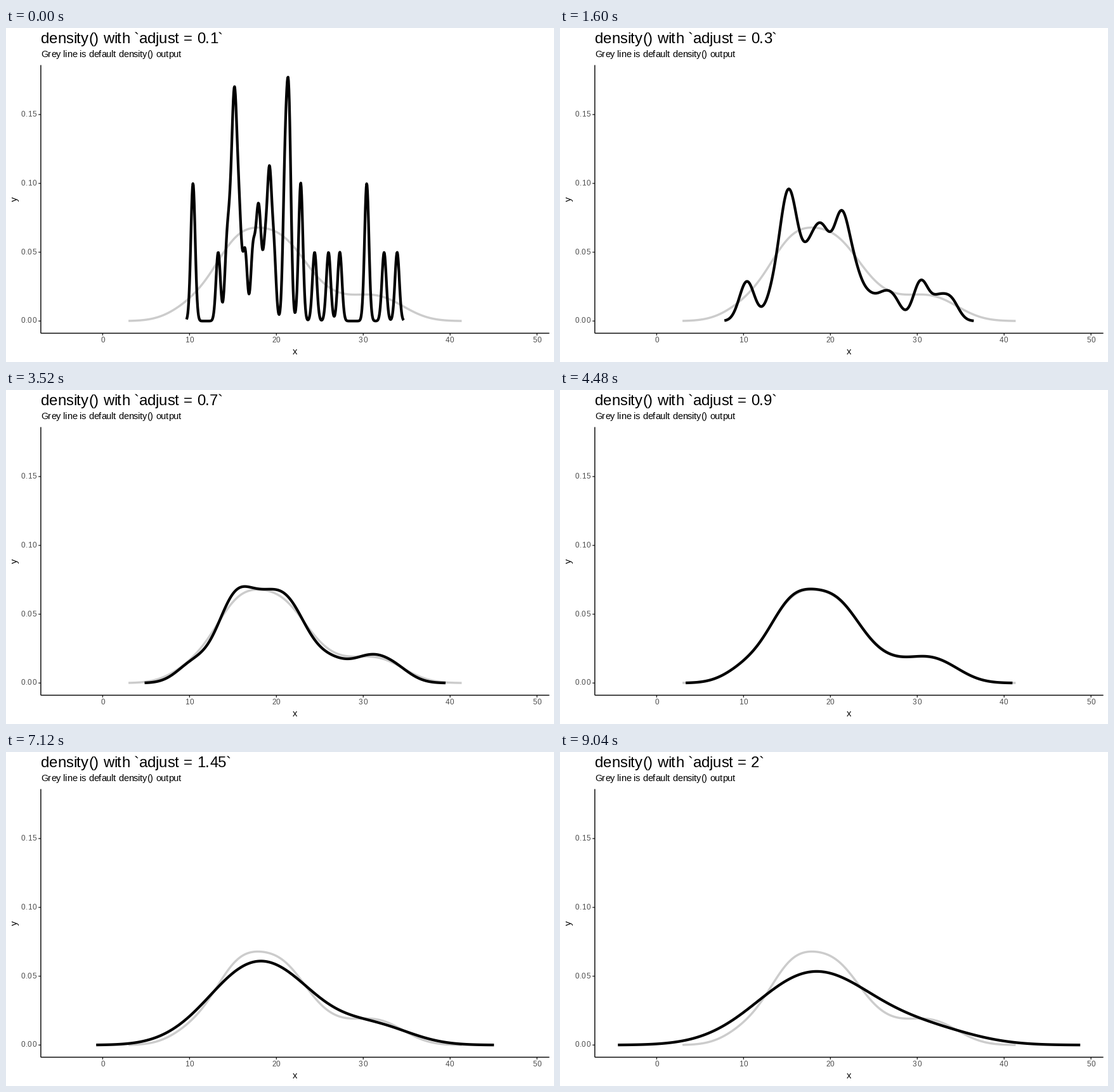
Recreate the animation shown at these times as a matplotlib script. Size 864 by 528 pixels, loop 9.6 s.

```python
import numpy as np
import matplotlib
import matplotlib.pyplot as plt
from matplotlib.animation import FuncAnimation
from matplotlib.textpath import TextPath

matplotlib.rcParams["font.family"] = "Liberation Sans"
matplotlib.rcParams["path.simplify"] = False

W, H, DPI = 864, 528, 96
FRAMES, INTERVAL = 120, 80
LEFT, RIGHT, TOP, BOTTOM = 54.9, 856.67, 58.6, 482.5
X0, X_SCALE = 152.4, 13.696
Y0, Y_SCALE = 463.25, 2176.4
TICK = 3.67
LAST_STATE = 38

DATA = np.array([
    21.0, 21.0, 22.8, 21.4, 18.7, 18.1, 14.3, 24.4, 22.8, 19.2, 17.8,
    16.4, 17.3, 15.2, 10.4, 10.4, 14.7, 32.4, 30.4, 33.9, 21.5, 15.5,
    15.2, 13.3, 19.2, 27.3, 26.0, 30.4, 15.8, 19.7, 15.0, 21.4])


def bandwidth(data):
    """Silverman's rule of thumb."""
    q1, q3 = np.percentile(data, [25, 75])
    spread = min(data.std(ddof=1), (q3 - q1) / 1.34)
    return 0.9 * spread * len(data) ** -0.2


def density(adjust, n=512):
    """Gaussian density of linearly binned data, cut three bandwidths out."""
    bw = adjust * bandwidth(DATA)
    lo, hi = DATA.min() - 3 * bw, DATA.max() + 3 * bw
    grid = np.linspace(lo - 4 * bw, hi + 4 * bw, n)
    pos = (DATA - grid[0]) / (grid[1] - grid[0])
    cell = pos.astype(int)
    part = pos - cell
    mass = (np.bincount(cell, 1 - part, minlength=n)
            + np.bincount(cell + 1, part, minlength=n))
    z = (grid[:, None] - grid) / bw
    dens = np.exp(-z * z / 2) @ mass / (len(DATA) * bw * np.sqrt(2 * np.pi))
    xs = np.linspace(lo, hi, n)
    return xs, np.interp(xs, grid, dens)


def to_px(xs, ys):
    return X0 + X_SCALE * np.asarray(xs), Y0 - Y_SCALE * np.asarray(ys)


def line_pt(size_mm):
    """Line size in mm to a line width in points."""
    return size_mm * 72.27 / 25.4 * 72 / 96


fig = plt.figure(figsize=(W / DPI, H / DPI), dpi=DPI, facecolor="white")
ax = fig.add_axes([0, 0, 1, 1])
ax.set_xlim(0, W)
ax.set_ylim(H, 0)
ax.axis("off")


def stroke(xs, ys, color, size_mm):
    line, = ax.plot(xs, ys, color=color, lw=line_pt(size_mm), snap=False,
                    solid_capstyle="butt", solid_joinstyle="round")
    return line


def ink_width(s):
    return TextPath((0, 0), s, size=100).get_extents().width / 100


em_widths = {}


def advance(ch, size):
    """Advance of a character, rounded to whole pixels."""
    if ch not in em_widths:
        em_widths[ch] = ink_width(f"|{ch}|") - ink_width("||")
    return round(em_widths[ch] * size * DPI / 72)


def write(x, y, s, size, color="black", align=0.0):
    """Set text on whole pixels; align is 0 for left, 0.5 centre, 1 right."""
    steps = [advance(ch, size) for ch in s]
    x -= align * sum(steps)
    glyphs = []
    for ch, step in zip(s, steps):
        if ch != " ":
            glyphs.append(ax.text(round(x), round(y), ch, size=size,
                                  color=color, ha="left", va="baseline"))
        x += step
    return glyphs


def draw_axes():
    label = dict(size=8.8, color="#4d4d4d")
    for v in range(0, 51, 10):
        x, _ = to_px(v, 0)
        stroke([x, x], [BOTTOM, BOTTOM + TICK], "#333333", 0.5)
        write(x, 497, str(v), align=0.5, **label)
    for v in (0, 0.05, 0.1, 0.15):
        _, y = to_px(0, v)
        stroke([LEFT - TICK, LEFT], [y, y], "#333333", 0.5)
        write(48.2, y + 3.2, f"{v:.2f}", align=1, **label)
    stroke([LEFT, LEFT], [BOTTOM, TOP], "black", 0.5)
    stroke([LEFT, RIGHT], [BOTTOM, BOTTOM], "black", 0.5)
    write((LEFT + RIGHT) / 2, 516, "x", 11, align=0.5)
    ax.text(18, (TOP + BOTTOM) / 2, "y", size=11, rotation=90,
            rotation_mode="anchor", ha="center", va="baseline")


draw_axes()
write(55, 46, "Grey line is default density() output", 11)
stroke(*to_px(*density(1)), "#cccccc", 1.2)

adjusts = [round(0.1 + 0.05 * i, 2) for i in range(LAST_STATE + 1)]
curves = [to_px(*density(a)) for a in adjusts]
curve = stroke(*curves[0], "black", 1.5)
title = []


def state_at(frame):
    """Three frames per state at first, two for the last eight."""
    if frame < 8:
        return 0
    if frame < 98:
        return 1 + (frame - 8) // 3
    return min(31 + (frame - 98) // 2, LAST_STATE)


def update(frame):
    curve.set_data(*curves[state_at(frame)])
    for glyph in title:
        glyph.remove()
    # The title follows the curve one frame late.
    value = adjusts[state_at(frame - 1)]
    title[:] = write(55, 24, f"density() with `adjust = {value:g}`", 18)
    return [curve, *title]


anim = FuncAnimation(fig, update, frames=FRAMES, interval=INTERVAL,
                     init_func=lambda: update(0), repeat=True,
                     repeat_delay=0, blit=False)
plt.show()
```
